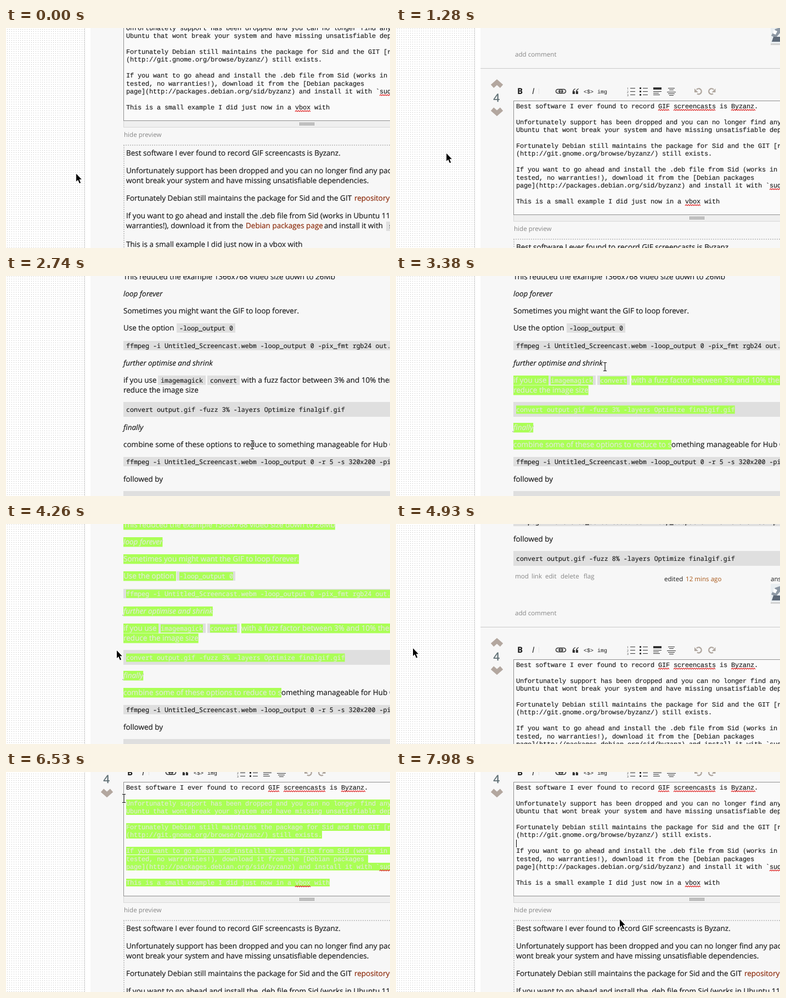
An HTML page for the animation above (8 s loop, 700x400 px).

```html
<!DOCTYPE html>
<html lang="en">
<head>
<meta charset="utf-8">
<title>Scrolling and selecting</title>
<style>
html, body { margin: 0; width: 100%; height: 100%; overflow: hidden; background: #fff; }
svg { display: block; width: 100vw; height: 100vh; }
text { white-space: pre; color: #1c1c1c; fill: currentColor; text-rendering: geometricPrecision; }
.body, .em { font: 13.5px "Open Sans", "Noto Sans", sans-serif; stroke: currentColor; stroke-width: .2px; }
.em { font-style: italic; }
.code { font: 11.667px "Noto Sans Mono", "DejaVu Sans Mono", monospace; stroke: currentColor; stroke-width: .15px; }
.edit { font: 12px "Liberation Mono", monospace; letter-spacing: -.2px; stroke: currentColor; stroke-width: .15px; }
.small { font: 11.6px "Open Sans", "Noto Sans", sans-serif; }
.score { font: 20px "Open Sans", sans-serif; color: #5a6b70; stroke: currentColor; stroke-width: .4px; }
.tool { font: 15px "Open Sans", sans-serif; }
.tiny { font: 10px "Liberation Mono", monospace; }
.digit { font: 5px "Open Sans", sans-serif; }
.bold { font-weight: bold; }
.slant { font-style: italic; }
.muted { color: #858585; }
.link { color: #8c2b0b; }
.age { color: #a9591a; }
.picked { color: #e3e8dc; }
</style>
</head>
<body>
<svg id="stage" viewBox="0 0 700 400" xmlns="http://www.w3.org/2000/svg">
  <defs>
    <pattern id="dots" width="4" height="4" patternUnits="userSpaceOnUse">
      <path d="M2 1h1v1h-1z" fill="#bbb"/>
    </pattern>
    <clipPath id="pageClip"><path/></clipPath>
    <clipPath id="editClip"><path/></clipPath>
  </defs>
  <rect width="700" height="400" fill="#fff"/>
  <rect x="143" width="1" height="400" fill="#d9d9d9"/>
  <rect x="154" width="546" height="400" fill="#f7f7f7"/>
  <g id="doc">
    <rect width="143" height="1100" fill="url(#dots)"/>
    <g id="boxes"></g>
    <g id="words"></g>
    <g clip-path="url(#pageClip)"><g id="pagePick"></g></g>
    <g clip-path="url(#editClip)"><g id="editPick"></g></g>
    <g id="marks"></g>
    <rect id="caret" x="219" y="693" width="1" height="14" fill="#000"/>
  </g>
  <g id="pointer">
    <path id="arrow" d="M0 0V14L3.2 11.1 5.9 17.4 8.1 16.4 5.5 10.3H9.8Z" fill="#000" stroke="#fff" stroke-width="1.6" paint-order="stroke"/>
    <g id="beam" fill="none">
      <path d="M-3-7.5H3M0-7.5V7.5M-3 7.5H3" stroke="#fff" stroke-width="2.4"/>
      <path d="M-3-7.5H3M0-7.5V7.5M-3 7.5H3" stroke="#000" stroke-width="1.1"/>
    </g>
  </g>
</svg>
<script>
const LOOP = 8000;
const NOTCH = 57;
const EDIT_TOP = 602, EDIT_LINE = 14.4, EDIT_BOTTOM = 795;
const $ = id => document.getElementById(id);

function add(parent, tag, attrs, content) {
  const node = document.createElementNS("http://www.w3.org/2000/svg", tag);
  for (const key in attrs) node.setAttribute(key, attrs[key]);
  if (content) node.textContent = content;
  $(parent).append(node);
  return node;
}
const box = (x, y, width, height, fill) => add("boxes", "rect", { x, y, width, height, fill });
const line = (d, stroke = "#333", width = 1, extra = {}) =>
  add("marks", "path", { d, stroke, "stroke-width": width, fill: "none", ...extra });
const shape = (d, fill = "#333") => add("marks", "path", { d, fill });
const text = (cls, x, y, content) => add("words", "text", { class: cls, x, y }, content);

const rows = { page: [], edit: [] };

// Text that can be highlighted: a lime copy lies above it and is revealed by a clip.
function selectable(area, cls, x, y, content, gap = 0) {
  const width = text(cls, x, y, content).getComputedTextLength() + gap;
  const [rise, height] = { code: [11.5, 15], edit: [11, 14] }[cls] || [13, 17.5];
  const group = area + "Pick";
  add(group, "rect", { x, y: y - rise, width, height, fill: "#aaff55" });
  add(group, "text", { class: cls + " picked", x, y }, content);
  if (!rows[area].includes(y)) rows[area].push(y);
}
const para = (y, content, cls = "body", x = 214) => selectable("page", cls, x, y, content);

function chip(x, y, width, content) {
  box(x, y - 13, width, 17, "#dfdfdf");
  para(y, content, "code", x + 5);
}
function block(top, content) {
  box(214, top, 486, 27, "#dfdfdf");
  para(top + 18, content, "code", 219);
}

// The answer above the editor
para(6, "This reduced the example 1366x768 video size down to 26Mb");
para(37, "loop forever", "em");
para(68, "Sometimes you might want the GIF to loop forever.");
para(99, "Use the option ");
chip(311, 99, 107, "-loop_output 0");
chip(214, 131, 486, "ffmpeg -i Untitled_Screencast.webm -loop_output 0 -pix_fmt rgb24 out.gif");
para(163, "further optimise and shrink", "em");
para(194, "if you use ");
chip(277, 194, 87, "imagemagick");
chip(367, 194, 59, "convert");
para(194, "with a fuzz factor between 3% and 10% then you can", "body", 429);
para(212, "reduce the image size");
block(229, "convert output.gif -fuzz 3% -layers Optimize finalgif.gif");
para(280, "finally", "em");
para(311, "combine some of these options to reduce to something manageable for Hub Query");
chip(214, 342, 486, "ffmpeg -i Untitled_Screencast.webm -loop_output 0 -r 5 -s 320x200 -pix_fmt rgb24");
para(374, "followed by");
block(391, "convert output.gif -fuzz 8% -layers Optimize finalgif.gif");

[["mod", 217], ["link", 247], ["edit", 272], ["delete", 300], ["flag", 342]]
  .forEach(([word, x]) => text("small muted", x, 441, word));
text("small", 489, 446, "edited");
text("small age", 528, 446, "12 mins ago");
text("small", 683, 446, "answered");
text("small muted", 217, 508, "add comment");

// Avatar
box(683, 453, 34, 34, "#d2d2d2");
box(683, 451, 34, 33, "#e9eef1");
shape("M684 470l7-12 9-3v10l-8 9z", "#8d98a4");
shape("M688 472h12v9h-15z", "#5d6978");
shape("M689 459l6 3-3 6-5-2z", "#fff");

box(154, 529, 546, 1, "#c9c9c9");

// Votes
line("M175.5 562l8.5-7.5 8.5 7.5M175.5 603.5l8.5 7.5 8.5-7.5", "#b3a79f", 8);
text("score", 177.5, 590, "4");

// Toolbar
text("tool bold", 221, 576, "B");
text("tool slant", 248, 576, "I");
line("M260.5 566v10", "#e2e2e2");
["M295 567.5h5a3.5 3.5 0 0 1 0 7h-5a3.5 3.5 0 0 1 0-7z", "M301 567.5h5a3.5 3.5 0 0 1 0 7h-5a3.5 3.5 0 0 1 0-7z"]
  .forEach(d => line(d, "#333", 1.5));
line("M296 571h9", "#333", 1.5);
for (const x of [327, 333]) shape(`M${x} 566c-4 1-6 5-5 10h4v-5h-2c0-2 1-3 3-4z`);
text("tiny", 342, 575, "<$>");
text("tiny", 367, 575, "img");
[565.5, 571.5, 577.5].forEach((y, i) => {
  text("digit", 421, y + 2, String(i + 1));
  line(`M427 ${y}h9M450 ${y}h9`);
  shape(`M444 ${y - 1.5}h3v3h-3z`);
});
line("M469 566h15", "#333", 4);
line("M469 571.5h15M469 574.5h10M469 577.5h12");
line("M496 565.5h12M498 568.5h8M494 572.5h16M496 575.5h12M498 578.5h8");
line("M548 568a5 5 0 1 1 1 7.5M579 568a5 5 0 1 0-1 7.5", "#b0a79f", 2.4);
shape("M544 566v7h7zM582.5 566v7h-7z", "#b0a79f");

// Editor
box(214, 588, 500, 208, "#8f8f8f");
box(215, 589, 500, 206, "#fafafa");
box(214, 796, 500, 12, "#d8d8d8");
box(215, 796, 500, 11, "#efefef");
for (let y = 799.5; y < 805; y += 2)
  line(`M535 ${y}h28`, "#333", 1, { "stroke-dasharray": "1 1" });

const typed = [
  "Best software I ever found to record GIF screencasts is Byzanz.",
  "",
  "Unfortunately support has been dropped and you can no longer find any packages for",
  "Ubuntu that wont break your system and have missing unsatisfiable dependencies.",
  "",
  "Fortunately Debian still maintains the package for Sid and the GIT [repository]",
  "(http://git.gnome.org/browse/byzanz/) still exists.",
  "",
  "If you want to go ahead and install the .deb file from Sid (works in Ubuntu 11.04,",
  "tested, no warranties!), download it from the [Debian packages",
  "page](http://packages.debian.org/sid/byzanz) and install it with `sudo dpkg -i`",
  "",
  "This is a small example I did just now in a vbox with"
];
const editY = row => Math.round(EDIT_TOP + EDIT_LINE * row);
typed.forEach((content, row) => {
  if (content) selectable("edit", "edit", 219, editY(row), content, row === 9 ? 7 : 0);
});

function squiggle(row, word) {
  const x = 219 + 7 * typed[row].indexOf(word);
  const wave = "l2-2 2 2".repeat(Math.round(word.length * 7 / 4));
  line(`M${x} ${editY(row) + 4}${wave}`, "#dd2222", 1.1);
}
[[0, "GIF"], [0, "screencasts"], [0, "Byzanz"], [10, "sudo"], [12, "vbox"]]
  .forEach(([row, word]) => squiggle(row, word));

// Preview
text("small muted", 215, 825, "hide preview");
line("M214 840H700M215 840V1100", "#c6c6c6", 2, { "stroke-dasharray": "2 2" });
[
  [859, "Best software I ever found to record GIF screencasts is Byzanz."],
  [891, "Unfortunately support has been dropped and you can no longer find any packages"],
  [909, "wont break your system and have missing unsatisfiable dependencies."],
  [941, "Fortunately Debian still maintains the package for Sid and the GIT"],
  [973, "If you want to go ahead and install the .deb file from Sid (works in Ubuntu 11.04,"],
  [991, "warranties!), download it from the"],
  [1025, "This is a small example I did just now in a vbox with"]
].forEach(([y, content]) => text("body", 219, y, content));
text("body link", 635, 941, "repository");
text("body link", 437, 991, "Debian packages page");
text("body", 580, 991, "and install it with");
box(693, 979, 20, 17, "#dfdfdf");
text("code", 698, 991, "sudo");

// Wheel notches: times of each, and the direction
const wheel = [
  [-1, [1040, 1130, 1230, 1350, 1730, 1860, 2310, 2360, 2420, 2480, 2540]],
  [1, [4420, 4490, 4560, 4640, 4710, 4930, 5020, 5110, 5200, 5300]]
];
const scrollAt = t => wheel.reduce(
  (y, [dir, times]) => y + dir * NOTCH * times.filter(at => at <= t).length, 11 * NOTCH);

// Pointer: time, x, y
const path = [
  [0, 128, 265], [40, 128, 265], [190, 90, 227], [240, 92, 228],
  [2500, 92, 228], [2730, 449, 307], [2870, 449, 307], [3070, 502, 306],
  [3120, 502, 306], [3740, 214, -30], [4099, 214, -30], [4100, 176, -20],
  [4250, 202, 230], [4420, 202, 230], [4710, 31, 226], [5150, 31, 226],
  [5700, 600, 212], [5760, 600, 212], [6510, 215, 48], [6570, 215, 48],
  [6640, 216, 130], [6700, 216, 130], [6880, 124, 144], [7270, 124, 144],
  [7400, 260, 120], [7550, 387, 138], [7890, 387, 138], [7975, 408, 268], [LOOP, 408, 268]
];
function pointerAt(t) {
  const i = Math.max(1, path.findIndex(step => step[0] >= t));
  const [t0, x0, y0] = path[i - 1], [t1, x1, y1] = path[i];
  const k = (t - t0) / (t1 - t0);
  return { x: x0 + (x1 - x0) * k, y: y0 + (y1 - y0) * k };
}
function docPoint(t) {
  const { x, y } = pointerAt(t);
  return { x, y: y + scrollAt(t) };
}

const drags = [
  { area: "page", start: 3120, end: 3740, clear: 5760 },
  { area: "edit", start: 5760, end: 6520, clear: 6640 }
];
function rowBand(area, y) {
  const list = rows[area];
  let i = list.findIndex(base => base + 5 >= y);
  if (i < 0) i = list.length - 1;
  return [i ? list[i - 1] + 5 : list[0] - 20, list[i] + 5];
}
function dragClip({ area, start, end, clear }, t) {
  if (t < start || t >= clear) return "M0 0";
  const anchor = docPoint(start), focus = docPoint(Math.min(t, end));
  const [top, firstEnd] = rowBand(area, focus.y);
  const [lastTop, bottom] = rowBand(area, anchor.y);
  return `M${focus.x} ${top}H800V${lastTop}H${anchor.x}V${bottom}H0V${firstEnd}H${focus.x}Z`;
}

const show = (id, on) => { $(id).style.display = on ? "" : "none"; };

function draw(t) {
  const scroll = scrollAt(t), { x, y } = pointerAt(t);
  $("doc").setAttribute("transform", `translate(0 ${-scroll})`);
  $("pointer").setAttribute("transform", `translate(${Math.round(x)} ${Math.round(y)})`);
  const overText = x > 213 && y + scroll < EDIT_BOTTOM;
  show("beam", overText);
  show("arrow", !overText);
  for (const drag of drags)
    $(drag.area + "Clip").firstElementChild.setAttribute("d", dragClip(drag, t));
  show("caret", t >= 6640 && t < 7290 || t >= 7690);
}

const began = performance.now();
function tick() {
  draw((performance.now() - began) % LOOP);
  requestAnimationFrame(tick);
}
tick();
</script>
</body>
</html>
```
